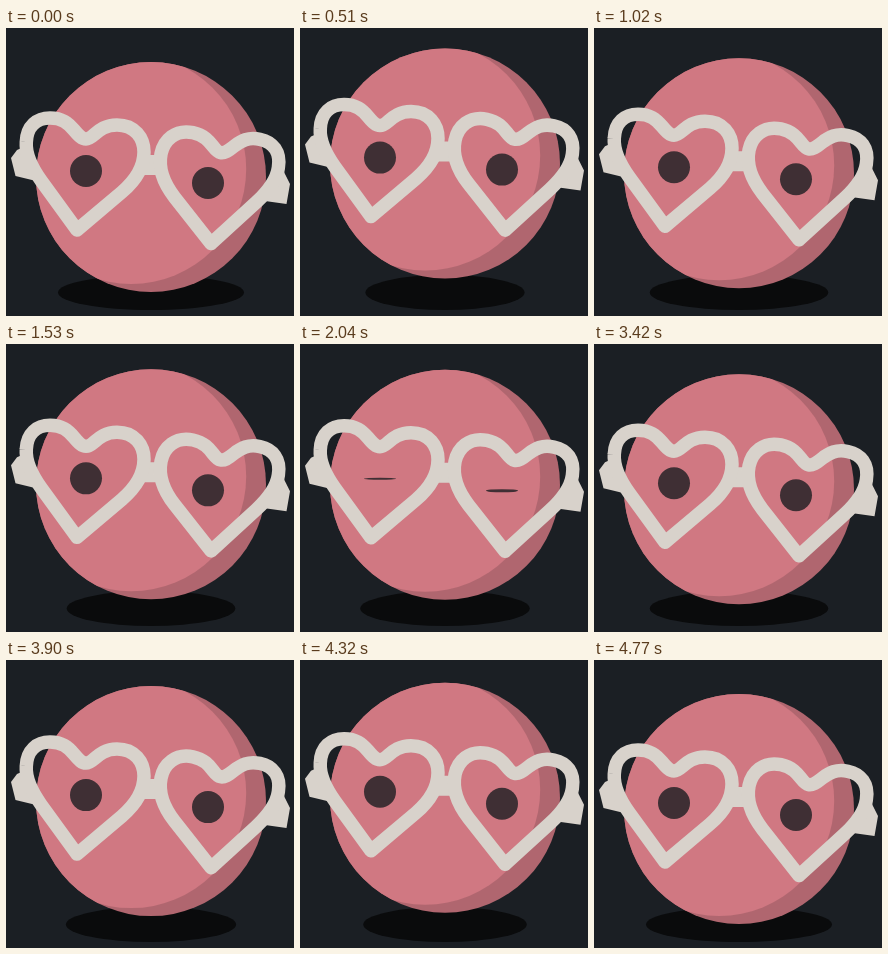
Write an HTML page with a canvas that moves like this. It is 288 px wide and 288 px high and loops after 4.8 s.

```html
<!DOCTYPE html>
<html lang="en">
<head>
<meta charset="utf-8">
<title>Bouncing ball in heart glasses</title>
<style>
  html, body { margin: 0; width: 100%; height: 100%; overflow: hidden; background: #1b1f24; }
  canvas { display: block; width: 288px; height: 288px; }
</style>
</head>
<body>
<canvas id="stage" width="288" height="288"></canvas>
<script>
const ctx = document.getElementById('stage').getContext('2d');
const TAU = Math.PI * 2;
const STEP = 30, LOOP = 160, BOUNCE = 40, PEAK = 19, HEIGHT = 15;
const BLINK_AT = 68, BLINK_HALF = 4;
const TILT = 0.101, BRIDGE = { x: 145.3, y: 137 };
const color = {
  back: '#1b1f24', shadow: '#0a0b0c', ball: '#d07882',
  shade: '#b0666f', frame: '#d8d2cb', eye: '#3f2f34'
};

const heart = new Path2D(
  'M71 202 L35 152.5 C24 137 19.5 125 20.3 114 ' +
  'C21 98 31 90 44 90 C56 90 62 95 68 102 ' +
  'C73 108 76 111 80 111 C88 111 92 97 111 97 ' +
  'C129 97 138 110 138 124 C138 139 130 152 116 164 Z');
const joints = new Path2D(
  'M138 127 H156 V147 H138 Z ' +
  'M11 122 L20 118 L32 153 L26 152 L9.5 148 L5 130 Z ' +
  'M278 144 L284 156 L280.5 176 L259 173 L266 160 Z');

function ellipse(x, y, rx, ry, fill) {
  ctx.fillStyle = fill;
  ctx.beginPath();
  ctx.ellipse(x, y, rx, ry, 0, 0, TAU);
  ctx.fill();
}

// Linear rise and fall; first and last step of a bounce both rest on the ground.
function lift(step) {
  const k = step % BOUNCE;
  const p = k <= PEAK ? k / PEAK : (BOUNCE - 1 - k) / (BOUNCE - 1 - PEAK);
  return HEIGHT * p;
}

function drawEye(x, y, step, closed) {
  const p = Math.min(1, Math.abs(step - BLINK_AT) / BLINK_HALF);
  ellipse(x, y, 16, 16 * (closed + (1 - closed) * p), color.eye);
}

function drawBall() {
  ellipse(145, 149, 115, 115, color.shade);
  ctx.save();
  ctx.beginPath();
  ctx.arc(145, 149, 115, 0, TAU);
  ctx.clip();
  ellipse(125.2, 141, 115, 115, color.ball);
  ctx.restore();
}

function drawGlasses() {
  ctx.fillStyle = ctx.strokeStyle = color.frame;
  ctx.lineWidth = 13.5;
  ctx.lineJoin = 'round';
  ctx.fill(joints);
  ctx.stroke(heart);
  // The other lens is a reflection across the tilted middle axis.
  ctx.save();
  ctx.translate(BRIDGE.x, BRIDGE.y);
  ctx.rotate(TILT);
  ctx.scale(-1, 1);
  ctx.rotate(-TILT);
  ctx.translate(-BRIDGE.x, -BRIDGE.y);
  ctx.stroke(heart);
  ctx.restore();
}

function draw(step) {
  const up = lift(step);
  ctx.fillStyle = color.back;
  ctx.fillRect(0, 0, 288, 288);
  ellipse(145, 264.5, 93 - up, 17.5, color.shadow);
  ctx.save();
  ctx.translate(0, -up);
  drawBall();
  drawEye(80, 143, step, 0.06);
  drawEye(202, 155, step, 0.1);
  drawGlasses();
  ctx.restore();
}

const start = performance.now();
function tick() {
  draw(Math.floor((performance.now() - start) / STEP) % LOOP);
  requestAnimationFrame(tick);
}
tick();
</script>
</body>
</html>
```
